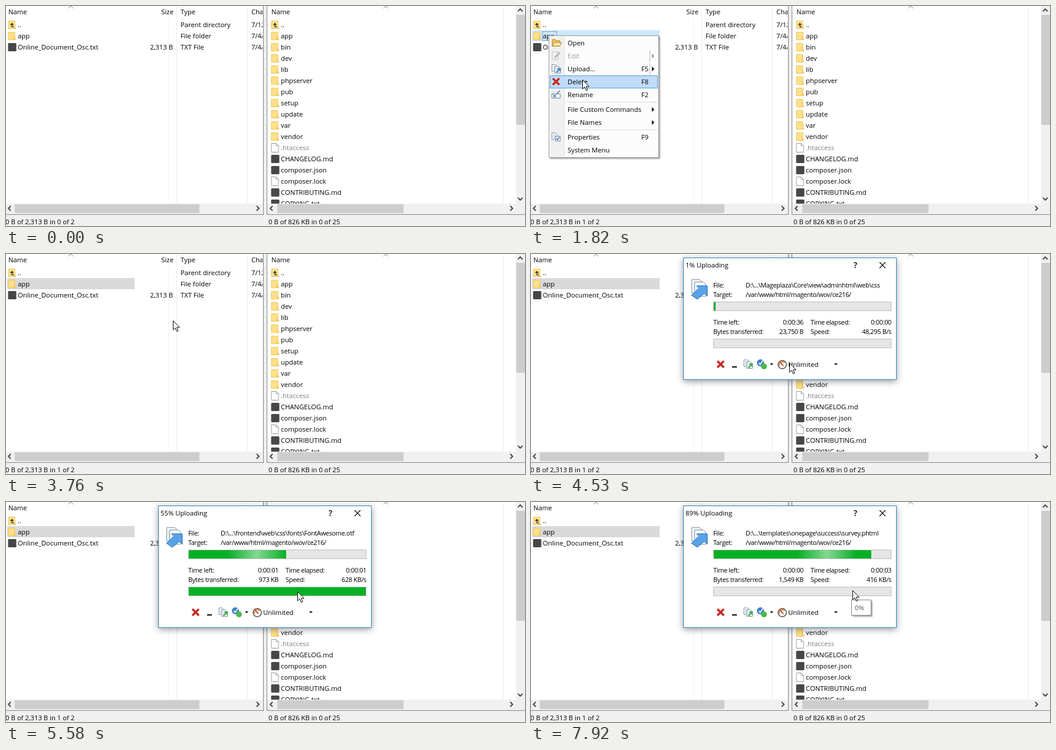
These frames come from a looping animation (880x374 px, 8 s). An HTML page:

```html
<!DOCTYPE html>
<html lang="en">
<head>
<meta charset="utf-8">
<title>Upload a folder</title>
<style>
html, body { margin: 0; width: 100%; height: 100%; overflow: hidden; background: #f0f0f0; }
svg { display: block; }
text { font: 11.3px "Open Sans", "Noto Sans", sans-serif; white-space: pre; }
.small text { font-size: 11px; letter-spacing: -.36px; }
#frame { filter: drop-shadow(0 3px 6px rgba(0,0,0,.38)); }
.popup { filter: drop-shadow(2px 2px 1px rgba(0,0,0,.35)); }
</style>
</head>
<body>
<svg id="stage" width="880" height="374" viewBox="0 0 880 374"></svg>
<script>
const LOOP = 8000, STEP = 77.3, START = 340;
const $ = id => document.getElementById(id);

// Markup helpers
const rect = (x, y, w, h, fill, more = '') =>
  `<rect x="${x}" y="${y}" width="${w}" height="${h}" fill="${fill}" ${more}/>`;
const box = (x, y, w, h, fill, stroke, more = '') =>
  rect(x + .5, y + .5, w - 1, h - 1, fill, `stroke="${stroke}" ${more}`);
const text = (x, y, s, more = '') => `<text x="${x}" y="${y}" ${more}>${s}</text>`;
const right = (x, y, s, id = '') => text(x, y, s, `text-anchor="end" ${id && `id="${id}"`}`);
const path = (d, fill = 'none', stroke = 'none', w = 1, more = '') =>
  `<path d="${d}" fill="${fill}" stroke="${stroke}" stroke-width="${w}" ${more}/>`;
const group = (s, more = '') => `<g ${more}>${s}</g>`;
const at = (x, y, s) => group(s, `transform="translate(${x} ${y})"`);

// Icons
const folder = path('M.5 .5H11.5V11.5H13V13.5H.5Z', '#ffe08a', '#edc55b') + path('M10.5 7V13', '', '#f6cd62', 2);
const upFolder = folder + path('M6.5 11V5M4 7.5L6.5 4.5L9 7.5M6 10.5H9.5', 'none', '#333', 1.3);
const codeFile = rect(0, 0, 14, 14, '#474747', 'rx="1.5"');
const blank = path('M.5 -.5H8.5L12.5 3.5V14.5H.5ZM8.5 -.5V3.5H12.5', '#fff', '#9a9a9a');
const cross = path('M2 2L13 13M13 2L2 13', 'none', '#c5281c', 3.4);
const page = (x, y, w, h) => at(x, y, path(`M.5 .5H${w - 4}L${w} 4V${h}H.5Z`, '#f4f8fc', '#7d93a9') +
  path(`M3 ${h * .35}H${w - 3}M3 ${h * .55}H${w - 3}M3 ${h * .75}H${w - 3}`, 'none', '#a8bccf'));
const pages = tint => page(0, 0, 10, 12) + page(5, 3, 10, 12) + path('M8 14L14 8M10 7.5H14.5V12', 'none', tint, 2);
const openFolder = path('M1 13V2H6L8 4H14V13Z', '#f5c856', '#a87c22') + path('M1 13L4 7H17L14 13Z', '#ffe9a5', '#a87c22');
const pencil = path('M1 1H11V14H1Z', '#f1f1f1', '#bbb') + path('M5 11L14 2', 'none', '#b5b5b5', 3);
const rename = path('M.5 6.5H14.5V13.5H.5Z', '#fff', '#5784ac') + path('M3 8L7 12M7 8L3 12M8 7L14 1', 'none', '#44688a', 1.4);
const props = page(0, 0, 10, 12) + path('M6.5 6.5H14.5V14.5H6.5Z', '#fff', '#5784ac') + path('M8 10L10 12.5L13 8', 'none', '#44688a', 1.4);
const triangle = (x, y, id = '') => path(`M${x - 3} ${y - 1}H${x + 3}L${x} ${y + 2}Z`, '#000', 'none', 1, id);
const chevron = (x, y, dx, dy) => path(dx
  ? `M${x - dx * 2} ${y - 4}L${x + dx * 2} ${y}L${x - dx * 2} ${y + 4}`
  : `M${x - 4} ${y - dy * 2}L${x} ${y + dy * 2}L${x + 4} ${y - dy * 2}`, 'none', '#404040', 1.8);
const sortMark = x => path(`M${x - 4} 4L${x} 0L${x + 4} 4`, 'none', '#808080');

// Local list
function leftPanel() {
  let s = rect(0, 0, 436, 336, '#fff');
  s += rect(275, 21, 1, 315, '#f3f3f3') + rect(289, 0, 1, 336, '#eaeaea') + rect(409, 0, 1, 336, '#eaeaea');
  s += rect(2, 41, 216, 19, '#e5f3ff', 'id="row"');
  s += sortMark(110) + text(4, 14, 'Name') + right(284, 14, 'Size') + text(296, 14, 'Type') + text(416, 14, 'Changed');
  [['..', '', 'Parent directory', '7/12/2017', upFolder],
   ['app', '', 'File folder', '7/4/2017', folder],
   ['Online_Document_Osc.txt', '2,313 B', 'TXT File', '7/4/2017', codeFile]].forEach(([name, size, type, date, icon], i) => {
    const y = 36 + i * 19;
    s += at(3.5, y - 11, icon) + text(20, y, name) + right(283, y, size) + text(296, y, type) + text(416, y, date);
  });
  s += box(19, 43, 25, 16, 'none', '#555', 'stroke-dasharray="1 1" id="focus"');
  s += rect(0, 336, 436, 18, '#f0f0f0') + rect(15, 337, 313, 15, '#cdcdcd') + chevron(6, 344, -1, 0) + chevron(427, 344, 1, 0);
  s += rect(435, 0, 8, 355, '#f0f0f0') + rect(436, 0, 1, 355, '#828790') + rect(0, 354, 437, 1, '#828790');
  return s + text(-1, 371, '', 'id="status"');
}

// Remote list
function rightPanel() {
  const names = '.. app bin dev lib phpserver pub setup update var vendor .htaccess CHANGELOG.md composer.json composer.lock CONTRIBUTING.md COPYING.txt'.split(' ');
  let s = rect(442, 0, 438, 355, '#fff') + rect(843, 0, 1, 336, '#eaeaea');
  s += sortMark(644) + text(450, 14, 'Name');
  names.forEach((name, i) => {
    const y = 36 + i * 19;
    const icon = !i ? upFolder : i < 11 ? folder : /htaccess|lock/.test(name) ? blank : codeFile;
    s += at(449.5, y - 11, icon) + text(466, y, name, i === 11 ? 'fill="#808080"' : '');
  });
  s += rect(443, 336, 437, 18, '#f0f0f0') + rect(460, 337, 214, 15, '#cdcdcd') + chevron(450, 344, -1, 0) + chevron(857, 344, 1, 0);
  s += rect(865, 0, 15, 336, '#f0f0f0') + rect(865, 15, 15, 187, '#cdcdcd') + chevron(872, 7, 0, -1) + chevron(872, 328, 0, 1);
  s += rect(442, 0, 1, 355, '#828790') + rect(442, 354, 438, 1, '#828790');
  return s + text(445, 371, '0 B of 826 KB in 0 of 25');
}

// Context menu: label, centre y, key, icon, arrow
const items = [
  ['Open', 63, '', openFolder], ['Edit', 85, '', pencil, 1], ['Upload...', 107, 'F5', pages('#2f7fd0'), 1],
  ['Delete', 129, 'F8', cross], ['Rename', 151, 'F2', rename],
  ['File Custom Commands', 176, '', '', 1], ['File Names', 198, '', '', 1],
  ['Properties', 223, 'F9', props], ['System Menu', 245, '', '']];
const hot = (x, w, id) => box(x, 96, w, 22, '#c0dcf8', '#4a9fec', `id="${id}"`);

function contextMenu() {
  let s = box(30, 50, 187, 208, '#fcfcfc', '#979797', 'class="popup"') + rect(32, 52, 24, 204, '#f0f0f0') + rect(56, 52, 1, 204, '#e0e0e0');
  s += hot(32, 183, 'menuHot') + rect(60, 163, 155, 1, '#d8d8d8') + rect(60, 210, 155, 1, '#d8d8d8');
  for (const [label, y, key, icon, arrow] of items) {
    const ink = label === 'Edit' ? '#9a9a9a' : '#000';
    s += at(35, y - 8, icon) + text(62, y + 4, label, `fill="${ink}"`) + text(187, y + 4, key);
    if (arrow) s += path(`M205 ${y - 4}L209 ${y}L205 ${y + 4}Z`, ink);
    if (y === 85 || y === 107) s += rect(201, y - 10, 1, 20, '#b8b8b8');
  }
  return s;
}

function subMenu() {
  let s = box(213, 96, 197, 73, '#fcfcfc', '#979797', 'class="popup"') + rect(215, 98, 24, 69, '#f0f0f0') + rect(239, 98, 1, 69, '#e0e0e0');
  s += box(215, 99, 193, 22, '#c0dcf8', '#4a9fec', 'id="subHot"') + at(218, 102, pages('#2f7fd0'));
  ['Upload...', 'Upload in Background...', 'Upload and Delete...'].forEach((label, i) => s += text(245, 114 + i * 22, label));
  return s + text(385, 114, 'F5');
}

// Progress dialog
const bar = (y, id, inner = '') => box(309, y, 302, 16, '#e6e6e6', '#bcbcbc') +
  `<svg id="${id}" x="310" y="${y + 1}" width="0" height="14">${rect(0, 0, 300, 14, '#06b025')}${inner}</svg>`;

function dialog() {
  let s = box(258, 6, 362, 208, '#fff', '#2b83c6', 'id="frame"') + text(262, 23, '', 'id="title"');
  s += text(547, 24, '?', 'style="font-weight:600;font-size:13.5px"') + path('M591 14L601 24M601 14L591 24', 'none', '#000', 1.2);
  s += page(272, 43, 18, 23) + page(277, 47, 19, 25) +
    path('M271 71L284 59L280 55H298V73L293 68L281 78Z', '#58a3e8', '#2f6fae', 1, 'transform="translate(1 -1)"');
  s += group(text(309, 57, 'File:') + text(364, 57, '', 'id="file"') + text(309, 73, 'Target:') +
    text(364, 73, '/var/www/html/magento/wov/ce216/') +
    text(309, 120, 'Time left:') + right(462, 120, '', 'left') + text(474, 120, 'Time elapsed:') + right(611, 120, '', 'elapsed') +
    text(309, 136, 'Bytes transferred:') + right(462, 136, '', 'bytes') + text(474, 136, 'Speed:') + right(611, 136, '', 'speed'), 'class="small"');
  s += bar(81, 'total', rect(0, 0, 100, 14, 'url(#shine)', 'id="gleam"')) + bar(144, 'part');
  s += at(314, 180, cross) + rect(341, 191, 8, 2, '#000') + at(360.5, 179.5, pages('#35a344'));
  s += '<circle cx="389" cy="185" r="6" fill="#3f7fd0"/><circle cx="395" cy="191" r="5" fill="#4cb84c"/>' +
    path('M386 185L388.5 188L393 181', 'none', '#fff', 1.6) + triangle(408, 187);
  s += '<circle cx="426" cy="188" r="7" fill="#fff" stroke="#555" stroke-width="1.6"/>' +
    path('M421.5 190A5 5 0 0 1 430 185', 'none', '#e88a2c', 2) + path('M422.5 184L428 190', 'none', '#c5281c', 1.8);
  return s + text(436, 192, 'Unlimited') + triangle(517, 187);
}

$('stage').innerHTML = `<defs><linearGradient id="shine">
  <stop offset="0" stop-color="#fff" stop-opacity="0"/><stop offset=".5" stop-color="#fff" stop-opacity=".5"/>
  <stop offset="1" stop-color="#fff" stop-opacity="0"/></linearGradient></defs>` +
  rect(0, 0, 880, 374, '#f0f0f0') + leftPanel() + rightPanel() +
  group(contextMenu(), 'id="menu"') + group(subMenu(), 'id="sub"') + group(dialog(), 'id="dialog"') +
  group(box(543, 166, 34, 27, '#fff', '#868686', 'class="popup"') + text(549, 184, '0%', 'fill="#575757"'), 'id="tip"') +
  path('M.5 .5V16L4 12.7L6.6 18.6L9 17.6L6.5 11.8H11.4Z', '#fff', '#000', 1, 'id="cursor"');

// Cursor stops: time, x, y
const stops = [[340, 110, -16], [800, 42, 46], [1030, 34, 53], [1110, 30, 50], [1190, 30, 50], [1500, 50, 82],
  [1800, 87, 125], [1840, 87, 125], [1960, 101, 112], [2035, 102, 113], [2270, 102, 113], [2800, 261, 107], [3270, 261, 107],
  [3280, 262, 107], [3500, 262, 107], [3740, 283, 113], [3780, 283, 113], [4500, 438, 185], [4560, 438, 185],
  [5200, 485, 157], [5500, 494, 152], [6590, 494, 152], [6900, 522, 177], [7400, 545, 152], [7890, 545, 150], [8000, 545, 150]];

// Progress: time, percent, file, left, bytes, elapsed, speed, part filled
const log = [
  [4010, 0, 'app', 0, '0 B', 0, '0 B/s', 0],
  [4440, 1, 'Mageplaza/Core/view/adminhtml/web/css', 36, '23,750 B', 0, '48,295 B/s', 0],
  [4740, 9, 'Mageplaza/Core/view/frontend/web/js', 9, '158 KB', 0, '231 KB/s', 1],
  [4970, 23, 'frontend/web/css/font-awesome.min.css', 4, '406 KB', 0, '418 KB/s', 0],
  [5210, 41, 'frontend/web/css/fonts', 2, '724 KB', 1, '571 KB/s', .5],
  [5500, 55, 'frontend/web/css/fonts/FontAwesome.otf', 1, '973 KB', 1, '628 KB/s', 1],
  [5740, 64, 'web/css/fonts/fontawesome-webfont.svg', 1, '1,121 KB', 1, '611 KB/s', .4],
  [5970, 71, 'web/css/fonts/fontawesome-webfont.ttf', 0, '1,243 KB', 2, '583 KB/s', 1],
  [6590, 77, 'frontend/web/js/view', 0, '1,342 KB', 2, '502 KB/s', 0],
  [6900, 83, 'frontend/web/template/container', 0, '1,448 KB', 2, '467 KB/s', 1],
  [7200, 87, 'frontend/templates/onepage', 0, '1,516 KB', 3, '432 KB/s', 1],
  [7360, 89, 'templates/onepage/success/survey.phtml', 0, '1,549 KB', 3, '416 KB/s', 0]];

function cursorAt(t) {
  const i = stops.findIndex(s => s[0] > t);
  if (i < 1) return [-30, -30];
  const [a, x, y] = stops[i - 1], [b, u, v] = stops[i], p = (t - a) / (b - a);
  return [Math.round(x + (u - x) * p), Math.round(y + (v - y) * p)];
}

const show = (id, on) => $(id).style.display = on ? '' : 'none';
const put = (id, s) => { if ($(id).textContent !== s) $(id).textContent = s; };
const set = (id, name, v) => $(id).setAttribute(name, v);
const clock = n => '0:00:' + String(n).padStart(2, '0');

function draw(now) {
  const raw = now % LOOP;
  const t = raw < START ? 0 : START + Math.floor((raw - START) / STEP) * STEP;
  const [x, y] = cursorAt(t);
  set('cursor', 'transform', `translate(${x} ${y})`);

  const picked = t > 1100, line = Math.floor((y - 22) / 19);
  show('row', picked || line >= 0 && line < 3);
  set('row', 'y', picked ? 41 : 22 + line * 19);
  set('row', 'fill', t > 3500 ? '#d9d9d9' : picked ? '#cce8ff' : '#e5f3ff');
  show('focus', picked && t < 3500);
  put('status', `0 B of 2,313 B in ${picked ? 1 : 0} of 2`);

  const open = t > 1180 && t < 3040, sub = open && t > 2480;
  show('menu', open);
  show('sub', sub);
  show('subHot', x > 214);
  const item = sub ? items[2] : items.find(i => Math.abs(i[1] - y) <= 11);
  show('menuHot', item && x > 31);
  if (item) set('menuHot', 'y', item[1] - 10.5);

  const row = log.filter(r => r[0] <= t).pop();
  show('dialog', row);
  if (row) {
    const [, pct, file, left, bytes, elapsed, speed, part] = row;
    put('title', pct + '% Uploading');
    put('file', 'D:\\...\\' + file.replace(/\//g, '\\'));
    put('left', clock(left));
    put('elapsed', clock(elapsed));
    put('bytes', bytes);
    put('speed', speed);
    set('total', 'width', pct * 3);
    set('part', 'width', part * 300);
    set('gleam', 'x', (t - (t < 6590 ? 4630 : 6600)) * .18 - 95);
  }
  show('tip', t > 7640);
  $('tip').style.opacity = Math.min(1, (t - 7600) / 280);
}

function tick() {
  draw(performance.now());
  requestAnimationFrame(tick);
}
tick();
</script>
</body>
</html>
```
